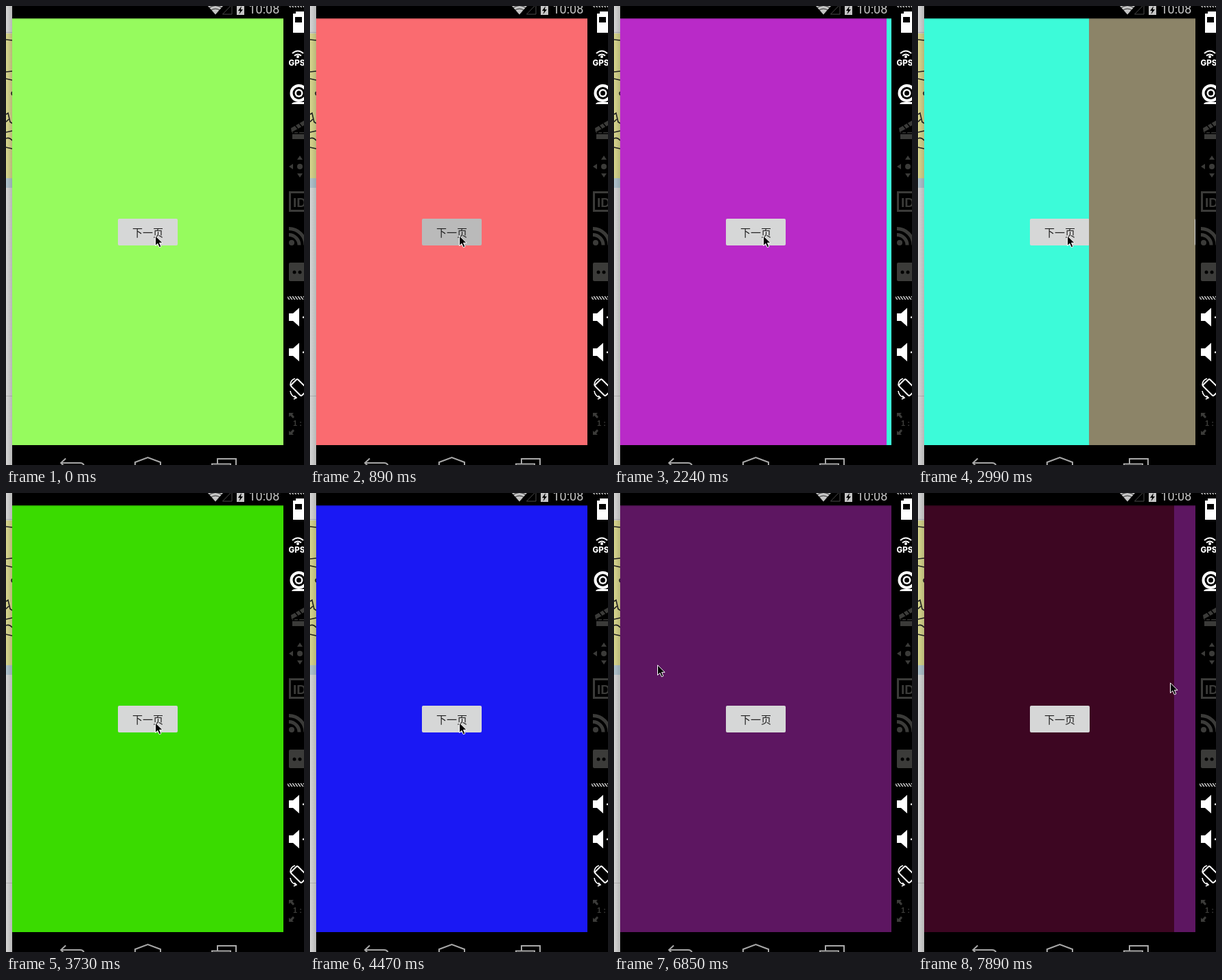
These frames come from a looping animation (434x669 px, 8 s). An HTML page:

```html
<!DOCTYPE html>
<html lang="zh">
<head>
<meta charset="utf-8">
<title>下一页</title>
<style>
html, body { margin: 0; width: 100%; height: 100%; overflow: hidden; background: #000; }
svg { position: absolute; left: 0; top: 0; }
.screen { position: absolute; left: 9px; top: 18px; width: 395px; height: 622px; overflow: hidden; }
.screen::after { content: ""; position: absolute; left: 0; top: 0; width: 100%; height: 2px;
  background: linear-gradient(rgba(0,0,0,.3), transparent); }
.page { position: absolute; left: 0; top: 0; width: 395px; height: 622px; background: var(--c);
  animation: 8s step-end infinite; }
.page b { position: absolute; left: 154px; top: 292px; width: 87px; height: 39px; border-radius: 2px;
  background: #d6d7d7; color: #202020; text-align: center;
  font: 400 15px/40px "Noto Sans CJK SC", "Noto Sans CJK", sans-serif; }
.coral { animation-name: coral; }
.slate { animation-name: slate; }
.violet { animation-name: violet; }
.aqua { animation-name: aqua; }
.olive { animation-name: olive; }
.green { animation-name: green; }
.blue { animation-name: blue; }
.wine { animation-name: wine; }
.plum { animation-name: plum; }
.coral b { animation: press1 8s step-end infinite; }
.slate b { animation: press2 8s step-end infinite; }

/* each page slides in from the right over the one below */
@keyframes coral  { 0% { transform: translateX(395px) } 5.625% { transform: translateX(240px) } 7.375%, 100% { transform: none } }
@keyframes slate  { 0% { transform: translateX(395px) } 13% { transform: translateX(200px) } 14.875%, 100% { transform: none } }
@keyframes violet { 0% { transform: translateX(395px) } 20.5% { transform: translateX(200px) } 22.375%, 100% { transform: none } }
@keyframes aqua   { 0% { transform: translateX(395px) } 28% { transform: translateX(388px) } 29.875% { transform: translateX(55px) } 31.75%, 100% { transform: none } }
@keyframes olive  { 0% { transform: translateX(395px) } 37.375% { transform: translateX(240px) } 39.25%, 100% { transform: none } }
@keyframes green  { 0% { transform: translateX(395px) } 44.75% { transform: translateX(240px) } 46.625%, 100% { transform: none } }
@keyframes blue   { 0% { transform: translateX(395px) } 54.125% { transform: translateX(240px) } 55.875%, 100% { transform: none } }
@keyframes wine   { 0% { transform: translateX(395px) } 67.125% { transform: translateX(247px) } 69%, 100% { transform: none } }
/* the last page is dragged back out by the pointer */
@keyframes plum {
  0% { transform: translateX(395px) }
  76.375% { transform: translateX(240px) }
  78.25% { transform: none }
  91.25% { transform: translateX(95px) }
  93.125% { transform: translateX(260px) }
  94.875% { transform: translateX(394px) }
  96.75% { transform: translateX(390px) }
  98.625%, 100% { transform: translateX(364px) }
}
@keyframes press1 { 0% { background: #d6d7d7 } 11.125% { background: #bababa } 14.875%, 100% { background: #d6d7d7 } }
@keyframes press2 { 0% { background: #d6d7d7 } 18.625% { background: #bababa } 22.375%, 100% { background: #d6d7d7 } }

.cursor { animation: move 8s step-end infinite; }
@keyframes move {
  0% { transform: translate(217px, 334px) }
  81.875% { transform: translate(194px, 321px) }
  83.75% { transform: translate(115px, 277px) }
  85.625% { transform: translate(63px, 250px) }
  89.375% { transform: translate(14px, 255px) }
  91.25% { transform: translate(100px, 262px) }
  93.125% { transform: translate(264px, 270px) }
  94.875% { transform: translate(418px, 275px) }
  96.75% { transform: translate(396px, 276px) }
  98.625%, 100% { transform: translate(367px, 276px) }
}
</style>
</head>
<body>
<svg width="434" height="669" viewBox="0 0 434 669">
  <defs>
    <linearGradient id="shade">
      <stop offset="0" stop-opacity=".02"/>
      <stop offset="1" stop-opacity=".16"/>
    </linearGradient>
    <pattern id="hatch" width="4" height="6" patternUnits="userSpaceOnUse" patternTransform="skewX(35)">
      <rect width="2" height="6" fill="#bbb"/>
    </pattern>
    <path id="speaker" d="M412 448h6l9-8v27l-9-8h-6zM432 452.500h2v2.500h-2z"/>
  </defs>
  <rect width="434" height="669"/>

  <!-- window behind -->
  <rect width="9" height="669" fill="#dadada"/>
  <path d="M0 38.500H9M0 568.500H9" stroke="#bbb"/>
  <rect y="40" width="9" height="211" fill="#dcda90"/>
  <rect y="251" width="9" height="14" fill="#b4c8d2"/>
  <path d="M0 49l9 1M0 96l9-1M0 106l9 2M9 125q-2 2 0 5M0 158l3-2 3 13 3 2M0 169l4-4M0 184l9-2M0 193q5-2 9 3M0 206l9 2"
    fill="none" stroke="#222" stroke-width="1.600"/>
  <rect width="9" height="669" fill="url(#shade)"/>

  <!-- status bar -->
  <g fill="#c4c4c4">
    <path d="M294 0H316L305 12.500z"/>
    <path d="M295 3q10-7 20 0M298 6.500q7-5 14 0" fill="none" stroke="#000" stroke-width=".8"/>
    <path d="M315.500 12H329V-2z" fill="none" stroke="#4a4a4a"/>
    <path d="M336 0H347V13H336z"/>
    <path d="M343 0l-5 7h3l-1.500 5 5.500-7h-3z" fill="#000"/>
    <text x="353.500" y="11" font-family="Roboto, sans-serif" font-size="18">10:08</text>
  </g>

  <!-- navigation bar -->
  <g fill="none" stroke="#a8a8a8" stroke-width="2">
    <path d="M87 659.500L80 666l7 7M80 666H108q5 0 6 5"/>
    <path d="M188 672V665L206.500 658 225 665V672"/>
    <path d="M308 667V660H335V672M300 672V667.500H327V672"/>
  </g>

  <!-- side tools -->
  <rect x="412" width="22" height="2" fill="url(#hatch)"/>
  <rect x="410" y="423" width="24" height="5" fill="url(#hatch)"/>
  <g fill="#fff">
    <path d="M422 8h12v3h2v28h-18V11h4z"/>
    <rect x="421" y="16" width="10" height="8" fill="#000"/>
    <circle cx="425" cy="74" r="2"/>
    <path d="M417 69q8-7 16 0M420 72.500q5-4 10 0" fill="none" stroke="#fff" stroke-width="2"/>
    <text x="411.500" y="87" font-family="Inter, Arial, sans-serif" font-weight="800" font-size="11.500">GPS</text>
    <circle cx="426.500" cy="127" r="13"/>
    <circle cx="426.500" cy="127" r="9" fill="#000"/>
    <circle cx="426.500" cy="127" r="6"/>
    <circle cx="426.500" cy="127" r="3.500" fill="#000"/>
    <path d="M416 143q1-3 6-3h12v3z"/>
    <use href="#speaker"/>
    <use href="#speaker" y="51"/>
  </g>
  <g fill="none" stroke="#fff" stroke-width="2">
    <rect x="-7" y="-11" width="14" height="22" rx="2" transform="translate(427 556) rotate(-45)"/>
    <path d="M414 553q0-8 7-10M414 561q1 8 9 10M420 568l3 3-4 2" stroke-width="1.600"/>
  </g>
  <g fill="#3b3b39">
    <path d="M415 178L434 167V174L416 184zM417 184H434V194H417z"/>
    <path d="M421 174l4 5M427 171l4 5M417 186h17M421 182l-3 4M428 182l-3 4" stroke="#000" stroke-width="1.500"/>
    <circle cx="428" cy="234" r="4"/>
    <path d="M424 224l4-6 4 6zM424 244l4 6 4-6zM418 230l-6 4 6 4z"/>
    <rect x="413.500" y="271.500" width="30" height="27" fill="none" stroke="#3b3b39" stroke-width="3"/>
    <text x="418" y="293" font-family="Liberation Sans, Arial, sans-serif" font-weight="700" font-size="19">ID</text>
    <circle cx="416" cy="345" r="4"/>
    <path d="M412 333.500a15 15 0 0 1 15 15M412 324.500a24 24 0 0 1 24 24" fill="none" stroke="#3b3b39" stroke-width="5"/>
    <rect x="412" y="374" width="26" height="27" rx="2"/>
    <g fill="#000"><circle cx="420" cy="388" r="2.500"/><circle cx="428" cy="388" r="2.500"/></g>
    <path d="M412 593h7l-2 2 3 4-2 2-4-4-2 2zM412 625h7l-2-2 3-4-2-2-4 4-2-2z"/>
    <text x="418" y="612" font-family="Liberation Sans, Arial, sans-serif" font-weight="700" font-size="11">1 :</text>
  </g>
</svg>

<div class="screen">
  <div class="page" style="--c:#96fb5e"><b>下一页</b></div>
  <div class="page coral" style="--c:#fa6b70"><b>下一页</b></div>
  <div class="page slate" style="--c:#5a6ea0"><b>下一页</b></div>
  <div class="page violet" style="--c:#b92ac8"><b>下一页</b></div>
  <div class="page aqua" style="--c:#3cfbd9"><b>下一页</b></div>
  <div class="page olive" style="--c:#8c8468"><b>下一页</b></div>
  <div class="page green" style="--c:#3adb00"><b>下一页</b></div>
  <div class="page blue" style="--c:#1a18f4"><b>下一页</b></div>
  <div class="page wine" style="--c:#3d0622"><b>下一页</b></div>
  <div class="page plum" style="--c:#5d1661"><b>下一页</b></div>
</div>

<svg width="434" height="669" viewBox="0 0 434 669">
  <path class="cursor" d="M.5.800V15.500L3.900 12.300 6.300 17.800 8.900 16.700 6.500 11.300H11z" stroke="#fff"/>
</svg>
</body>
</html>
```
